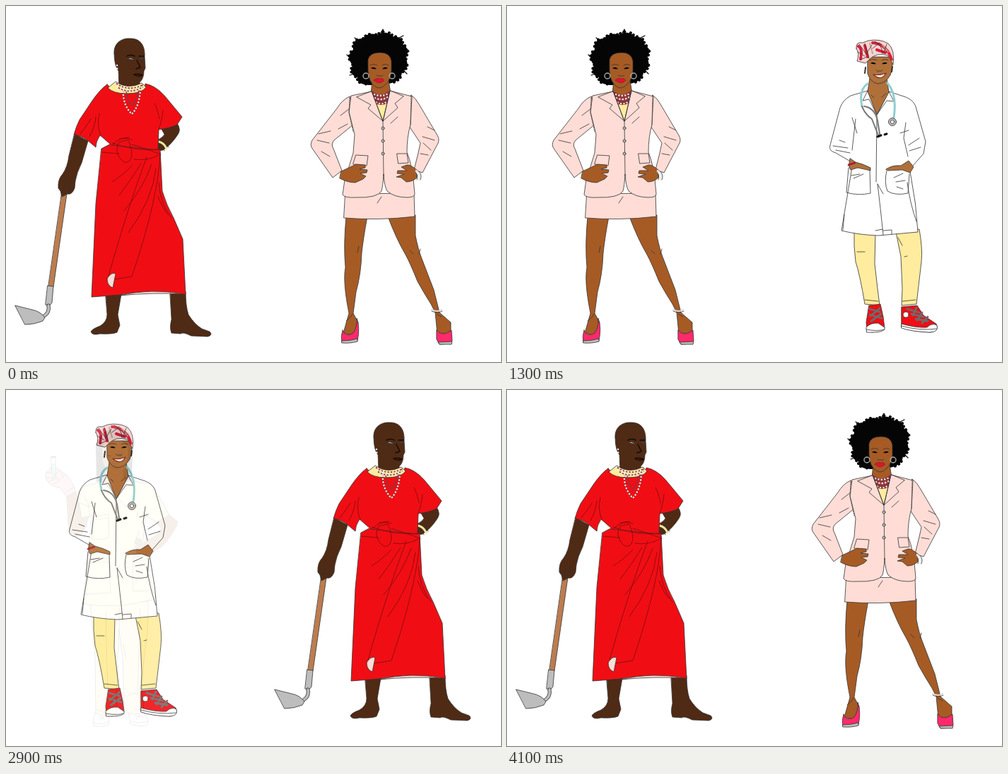
Recreate the animation shown at these times as an HTML page. Size 700x504 px, loop 4200 ms.

```html
<!DOCTYPE html>
<html lang="en">
<head>
<meta charset="utf-8">
<title>Women at work</title>
<style>
html, body { margin: 0; width: 100%; height: 100%; overflow: hidden; background: #fff; }
svg { display: block; width: 700px; height: 504px; }
path, circle, ellipse { stroke: #333; stroke-width: .8; stroke-linejoin: round; stroke-linecap: round; }
.side { isolation: isolate; }
.side use { mix-blend-mode: plus-lighter; }
.line { fill: none; }
.fold { fill: none; stroke: #7c0d10; }
.solid { fill: #050505; stroke: none; }
.white { fill: #fff; }
.red { fill: #f00e14; }
.yellow { fill: #ffec9e; }
.pink { fill: #ffddd6; }
.rose { fill: #f7b5b4; }
.hot { fill: #ff2a6b; }
.gray { fill: #bdbdbd; }
.lips { fill: #e3122a; stroke-width: .4; }
.wood { fill: #bd7c4e; }
.teal { fill: none; stroke: #8fcfd0; stroke-width: 3; }
.tube { fill: none; stroke: #777; stroke-width: 2; }
.beads { fill: none; stroke: #eee; stroke-width: 2.4; stroke-dasharray: .1 4.4; }
.cord { fill: none; stroke: #8d3440; stroke-width: 1.6; }
.stitch { fill: none; stroke-dasharray: 1.5 1.5; }
.deep { fill: #4f2a15; }
.dark { fill: #693a1c; }
.mid { fill: #a65b25; }
.warm { fill: #b0703a; }
.light { fill: #b0682f; }
</style>
</head>
<body>
<svg viewBox="0 0 700 504">
<defs>
<g id="face">
  <path class="line" stroke-width="1.3" d="M-13-8Q-8-11-3-8M4-8Q9-11 13-8"/>
  <path class="solid" d="M-12-4Q-8-7-4-3Q-8-2-12-4ZM4-3Q8-7 12-4Q8-2 4-3Z"/>
  <path class="line" d="M-4 6Q-2 8 0 7Q3 8 5 6"/>
</g>

<g id="farmer">
  <path class="wood" d="M81 250L88 252L67 398L60 397Z"/>
  <path class="gray" d="M59 396L67 397L65 420Q61 427 56 423Z"/>
  <path class="line" style="stroke-width:5" d="M60 424Q62 436 51 440"/>
  <path class="line" style="stroke:#bdbdbd;stroke-width:3.4" d="M60 424Q62 436 51 440"/>
  <path class="gray" d="M13 424L37 430Q48 432 55 441L52 446Q40 451 27 451Z"/>
  <path class="deep" d="M141 409L163 408L158 437L161 452L157 462Q150 465 133 464Q122 467 120 461Q122 457 133 453Q143 447 143 437ZM232 404H254Q254 425 258 437Q266 450 277 457L288 461Q293 466 285 468L262 467Q250 461 247 464L234 463Q231 455 234 444Z"/>
  <path class="deep" d="M97 181L116 191L107 222Q100 236 98 248L97 258Q93 268 87 266L79 270L77 262L74 258Q73 245 80 238Q87 228 89 212Z"/>
  <path class="line" d="M80 263L84 252L91 250M88 264L91 255"/>
  <path class="deep" d="M220 174L242 166Q248 175 243 182Q234 196 222 204L215 205L214 190Q222 186 224 182Z"/>
  <path class="line" style="stroke:#f0e59a;stroke-width:3" d="M216 192Q224 194 227 202"/>
  <path class="line" d="M214 194Q222 197 224 205M219 190Q227 192 230 200"/>
  <path class="red" d="M135 202L150 194L218 203L221 262Q227 282 237 300L250 330L254 409Q205 400 160 409L121 412L127 280Z"/>
  <path class="pink" d="M160 410Q205 399 252 408Q210 405 160 410Z"/>
  <path class="red" d="M143 111Q133 118 122 134L104 161Q99 171 96 182Q108 184 115 190Q121 195 127 200Q127 192 133 183L149 197L215 204L216 175Q232 173 242 168L249 157Q240 146 230 134Q217 117 204 112L197 110Q197 122 172 124Q154 124 143 111Z"/>
  <path class="fold" d="M134 183Q128 170 132 152M118 185Q126 171 127 157M105 181Q114 170 120 160M216 175Q221 160 222 148M217 160Q214 145 210 138M218 203Q182 206 150 194M150 197Q163 183 178 189M160 188L174 186M178 196Q197 202 219 210M160 193Q153 204 161 215Q168 226 176 218Q181 208 173 190ZM199 214Q174 280 145 382M218 208Q216 270 178 383L147 388M178 226Q165 240 150 249M191 223Q177 246 160 268M206 224Q194 258 167 290M212 230Q207 275 173 321M216 250Q218 280 234 300M215 270Q222 288 229 295M181 217Q200 220 216 211M135 207L160 209"/>
  <path class="pink" d="M143 386Q149 376 155 379L151 399Q143 396 143 386Z"/>
  <path class="deep" d="M153 67C152 53 163 45 176 46C190 46 197 56 196 72L197 88L195 92Q195 103 189 108L190 117H160L159 92Q153 84 153 67Z"/>
  <path class="yellow" d="M144 116L155 107Q172 119 192 109L198 115Q192 124 170 124Q152 124 144 116Z"/>
  <path class="cord" d="M155 109Q172 122 193 112M158 115Q174 126 193 115M166 117Q164 139 178 153Q189 141 190 118M170 120Q172 140 180 140L188 120"/>
  <path class="beads" d="M155 109Q172 122 193 112M158 115Q174 126 193 115M166 117Q164 139 178 153Q189 141 190 118"/>
  <path class="beads" d="M157 84L158 98"/>
  <path class="line" style="stroke:#160b06;stroke-width:1.5" d="M171 71Q177 68 182 71M188 71L195 71M185 77L190 87L184 89M181 97Q187 95 193 98Q187 101 181 97"/>
  <path class="white" style="stroke-width:1" d="M172 75Q177 72 181 76ZM189 75Q192 73 195 75Z"/>
</g>

<g id="suit">
  <path class="solid" d="M148 112C138 112 128 108 130 101C120 99 119 88 124 84C116 78 117 66 124 62C122 50 130 45 138 46C143 38 153 39 158 41C165 35 178 38 180 43C190 43 195 48 194 54C202 58 202 68 198 74C203 82 200 90 193 94C192 104 184 108 174 110Z"/>
  <path class="line" style="stroke:#050505;stroke-width:4;stroke-dasharray:.1 6 .1 9 .1 5" d="M148 110C138 112 128 108 130 101C120 99 119 88 124 84C116 78 117 66 124 62C122 50 130 45 138 46C143 38 153 39 158 41C165 33 178 37 180 43C190 43 195 48 194 54C202 58 202 68 198 74C203 82 200 90 193 94C192 104 184 108 174 110"/>
  <path class="line" style="stroke:#050505;stroke-width:1.2" d="M163 38L166 33L168 37M189 45L195 42M199 60L203 64M196 92L200 96M119 73L115 69M125 96L119 98M130 48L126 45"/>
  <path class="mid" d="M151 105L149 124L163 155L177 124L174 105Z"/>
  <path class="mid" d="M145 76Q147 66 162 66Q176 66 178 78V92Q177 104 170 111Q162 119 155 114Q146 108 145 92Z"/>
  <use href="#face" x="161" y="92"/>
  <path class="lips" d="M153 105Q157 101 161 103Q165 101 168 105Q161 113 153 105Z"/>
  <circle class="line" cx="142" cy="99" r="4" style="stroke:#aaa;stroke-width:1.4"/>
  <circle class="line" cx="179" cy="99" r="4" style="stroke:#aaa;stroke-width:1.4"/>
  <path class="mid" d="M114 298L144 298Q138 330 136 350Q135 380 128 405L124 435L131 448L129 468L110 463L118 435Q109 390 113 370Q110 340 114 298ZM173 298L212 296V325Q216 345 220 355L238 402L246 434L262 448V470L243 465L240 434L234 422Q225 408 215 390Q205 365 198 352Q185 330 173 298Z"/>
  <path class="line" d="M130 349L132 340M217 351L219 344M204 346L209 351M114 446Q121 441 123 436M242 436L249 440"/>
  <path class="line" style="stroke:#ddd;stroke-width:2" d="M235 430Q243 434 249 430"/>
  <path class="line" d="M235 432Q243 436 250 432"/>
  <path class="hot" d="M109 459Q113 470 124 463Q130 455 129 442Q134 455 130 474Q120 477 108 476Q106 468 109 459ZM242 459Q250 469 263 459L264 474Q262 479 246 479L242 472Z"/>
  <path class="gray" d="M108 474Q120 474 130 471V475Q120 478 108 477ZM244 476L264 475L263 479H247Z"/>
  <path class="pink" d="M113 266L210 265L211 298Q160 304 111 300Z"/>
  <path class="yellow" d="M151 130Q163 149 175 130L166 163Z"/>
  <path class="cord" style="stroke-width:6" d="M151 124Q163 134 174 124M153 133Q164 141 173 133"/>
  <path class="beads" d="M150 123Q163 131 175 123M151 128Q163 136 174 128M153 134Q164 143 173 134"/>
  <path class="pink" d="M119 128Q108 133 101 145L66 190Q62 197 67 203L95 243L108 233L96 202Q92 196 97 190L124 168ZM206 126Q213 131 217 139L243 183Q247 190 243 196L222 236L210 232L216 208L219 194L203 170Z"/>
  <path class="pink" d="M150 121L121 127L118 150L126 182L124 208Q118 228 112 246L109 267Q112 272 128 271Q158 272 164 262Q166 255 167 238Q168 255 172 262Q182 271 200 271Q211 271 211 266Q208 225 200 207Q200 185 205 168L207 128L176 120L166 163Z"/>
  <path class="line" d="M150 121L166 163L145 145L149 140L129 129ZM176 120L166 163L187 144L183 138L195 128ZM166 163L167 240M128 211L145 212L143 226L124 224ZM186 209H200L202 222L188 223ZM75 181L92 177M73 190L90 194M79 206L91 213M119 145L106 155M103 174L116 167M229 171L239 176M222 185L239 190M223 194L234 204M219 209L230 211M164 270L158 279M177 166L187 157"/>
  <path class="stitch" d="M119 130L118 151L124 178M206 128L205 168"/>
  <g class="gray"><circle cx="166" cy="173" r="2"/><circle cx="166" cy="191" r="2"/><circle cx="166" cy="209" r="2"/></g>
  <path class="mid" d="M107 234Q120 228 128 224L141 225V229L133 231L144 232L143 236L134 237L142 241L138 245L127 250Q116 250 105 244ZM215 233Q205 224 200 225L192 228L200 233L187 233L186 237L196 238L185 242L192 243L199 249Q208 249 214 243Z"/>
  <path class="line" style="stroke:#eee;stroke-width:4" d="M213 234Q219 239 217 245"/>
  <path class="line" d="M211 233Q216 240 214 246M217 234Q222 240 219 246"/>
</g>

<g id="engineer">
  <path class="dark" d="M142 447L160 448L156 459L140 457Z"/>
  <path class="gray" d="M126 455Q130 449 146 449L150 453L138 461Q126 460 126 455ZM135 462Q140 455 152 454Q164 456 167 451L183 449L187 462L181 466L177 457L166 463Q160 469 140 469Q134 467 135 462Z"/>
  <path class="gray" d="M127 258L188 257L186 305L188 340L183 450Q164 455 146 450L142 449L134 333Q129 300 127 258Z"/>
  <path class="line" d="M145 330Q152 345 161 348M149 342Q152 380 147 450M163 283L166 295"/>
  <path class="line" style="stroke-dasharray:12 3 2 3" d="M173 264L171 320M177 376L176 425"/>
  <path class="white" d="M146 114L158 118L185 106L160 142L134 195L125 190L126 170Q133 145 141 131Z"/>
  <path class="dark" d="M139 77L168 74L174 90L180 102L178 110L157 121Q150 118 145 113Q139 106 139 96Z"/>
  <path class="pink" d="M173 77L193 80Q194 94 187 98L178 99Z"/>
  <path class="solid" d="M168 75H176L175 92L171 88Z"/>
  <path class="line" d="M181 82Q190 84 189 92M178 86Q186 88 184 96"/>
  <path class="line" style="stroke:#180c06;stroke-width:1.2" d="M140 84Q144 81 147 84M152 84Q157 81 162 84M148 90L145 98L150 99M163 100L166 95"/>
  <path class="solid" d="M141 89L147 87L147 90ZM152 89L160 87L158 90Z"/>
  <path style="fill:#8a3b2e;stroke-width:.4" d="M142 104Q147 102 152 105Q147 110 142 104Z"/>
  <circle class="white" cx="178" cy="98" r="1.5"/>
  <path class="yellow" d="M123 74Q130 71 135 70Q137 50 160 44Q180 42 194 56Q200 66 200 80Q196 83 190 79Q170 73 152 75L125 77Z"/>
  <path class="line" d="M135 70Q165 67 199 76M142 70Q145 54 159 45M153 69Q157 54 168 47Q176 45 182 48M163 69Q170 54 187 51M174 71Q179 58 192 56"/>
  <path class="white" d="M146 114L157 121L178 108L186 109L158 144L150 133L142 138L143 122Z"/>
  <path class="line" d="M157 121L150 133"/>
  <path class="red" d="M183 107Q192 112 197 122Q204 136 201 149Q199 168 193 180Q189 186 189 200L190 258Q160 266 122 261L125 205L128 190Q140 150 162 126Z"/>
  <path class="fold" d="M183 108L176 133L169 134L173 141Q150 168 129 190M195 136Q179 147 164 171M166 163L148 184Q144 195 150 207L163 209Q178 202 193 178M151 181L166 189M148 190L163 197M160 171L175 180M168 168Q180 160 188 151M166 176L180 186M128 205L127 242"/>
  <path class="white" d="M65 147L128 207L124 211L88 189L60 156Z"/>
  <path class="gray" d="M60 150L64 146L68 150L66 163L62 160ZM63 158L89 184L124 207V211L88 189L61 162Z"/>
  <path class="dark" d="M83 155L92 150L98 152Q104 160 110 167L127 177L126 190L112 184L97 172Q88 172 82 165Z"/>
  <path class="gray" d="M80 156L108 153L109 156L81 159Z"/>
  <path class="dark" d="M151 190L126 190Q112 182 102 180L89 178Q84 184 89 190L98 199Q110 203 124 204L150 206Q146 198 151 190Z"/>
  <path class="line" d="M89 184L99 186M90 190L101 191M86 163L98 160"/>
</g>

<g id="doctor">
  <path class="yellow" d="M124 318L154 320L153 365L157 400L160 424L139 422Q132 380 126 362Q123 340 124 318ZM183 318L216 316Q221 345 219 362L212 422L191 424L192 400L190 355Z"/>
  <path class="line" d="M128 348L139 348M195 355L199 354M139 416L158 418M192 418L211 416M186 328L192 339"/>
  <path class="red" d="M145 424L161 422L165 440L167 456Q158 464 142 461L141 448ZM191 426L213 424L222 438L240 450Q245 459 232 462Q205 461 191 455Z"/>
  <path class="white" d="M141 455Q147 448 158 449L167 455Q169 463 142 462ZM191 450Q212 456 227 455Q234 448 241 452Q244 462 230 462Q205 461 191 456Z"/>
  <path class="line" d="M142 458Q155 461 167 458M191 453Q215 460 241 457"/>
  <circle class="white" cx="197" cy="437" r="4"/>
  <path class="line" style="stroke:#6c6c6c;stroke-width:2.8" d="M146 429L160 433M160 428L147 439M146 437L163 442M162 436L148 446M199 429L216 434M212 427L207 438M205 436L222 440M220 434L213 445M211 443L228 446M228 440L220 449"/>
  <path class="white" d="M143 120L119 127Q108 133 104 144L90 197Q87 205 98 208L122 222L119 240L106 318Q130 324 158 325L214 320Q212 280 204 240L202 230L207 226L222 209L225 192L212 146Q210 134 197 129L173 121L157 152Z"/>
  <path class="warm" d="M146 102L143 121L156 154L173 122L170 102Z"/>
  <path class="warm" d="M143 72H178Q179 88 175 98Q168 110 157 110Q147 108 143 96Z"/>
  <path class="line" d="M148 126L152 130M169 124L163 129"/>
  <use href="#face" x="159" y="85"/>
  <path class="white" style="stroke:#7a2d25;stroke-width:1.2" d="M151 97Q160 99 169 95Q162 107 151 97Z"/>
  <path style="fill:#f6d5d2" d="M127 60Q126 50 136 52L144 49Q160 46 172 53Q182 62 179 83L172 70Q155 65 145 76L140 81L128 78Q132 68 127 60Z"/>
  <path class="line" style="stroke:#d8203c;stroke-width:4;stroke-dasharray:6 2" d="M130 57Q136 60 133 75M139 56L143 72M150 52Q170 54 177 76M156 62L168 66"/>
  <path class="line" style="stroke:#b9a58f;stroke-width:2;stroke-dasharray:4 2" d="M146 53L150 67M164 55L172 65"/>
  <path class="line" d="M131 54L141 68L149 55M139 53L145 74M153 50Q164 56 164 67M129 65L139 71M150 60L160 52M170 54L166 66M133 76L142 72"/>
  <path class="line" style="stroke-width:2" d="M140 87L139 95M178 86L177 93"/>
  <path class="line" d="M143 120L136 134L145 132L156 154L155 249M157 252Q161 285 165 324M173 121L180 135L170 134L156 154M126 160L121 204M121 158L128 180M197 165L194 187L200 213M189 180L201 176M201 197L216 187M202 205L218 200M94 198L115 201M98 204L118 208M103 190L111 193M110 295L108 317M165 318L177 317V323M154 318L164 316M157 252L165 266M199 250Q203 280 212 305"/>
  <path class="line" d="M116 229L113 264Q130 269 147 265L146 232M170 233Q166 250 171 262Q182 269 200 265L202 238M120 240L132 238M123 244L137 238M180 243L193 237M183 249L196 247M184 256L193 259"/>
  <path class="warm" d="M118 216Q115 228 119 232L129 229L147 233V229Q138 224 126 221ZM169 231Q178 225 190 226L201 219L208 228L203 236L192 232L172 233Z"/>
  <path class="line" style="stroke:#a41c3a;stroke-width:2.5" d="M116 225L125 222"/>
  <path class="teal" d="M143 110Q130 118 135 142M171 109Q185 125 180 158"/>
  <path class="tube" d="M135 142Q139 153 149 160L158 183M138 142Q153 144 157 162L160 181"/>
  <path class="line" style="stroke:#111;stroke-width:3" d="M157 185L162 183M167 182L170 181"/>
  <circle class="gray" cx="178" cy="164" r="5.5"/><circle class="white" cx="178" cy="164" r="2.6"/>
</g>

<g id="nurse">
  <path class="solid" d="M128 130L127 80Q131 58 150 56Q160 53 170 59Q178 61 176 72L179 90L178 131L150 132Z"/>
  <path class="light" d="M142 106L139 130L157 156L174 132L166 124V106Z"/>
  <path class="light" d="M136 80Q140 68 154 69Q168 69 173 82L172 96Q170 110 164 116L155 122L146 117Q136 108 136 92Z"/>
  <path class="line" style="stroke:#050505;stroke-width:3;stroke-dasharray:.1 4" d="M137 76Q154 60 172 78"/>
  <use href="#face" x="154" y="97"/>
  <path style="fill:#9c4c38;stroke-width:.5" d="M147 110Q154 106 160 110Q154 116 147 110Z"/>
  <path class="light" d="M86 148L99 144Q103 165 106 177L118 176L112 195Q106 207 99 207Q89 205 88 190Z"/>
  <path class="light" d="M211 186L229 175L243 187Q240 198 224 218Q214 228 198 235L190 233L193 217L212 206L220 196Z"/>
  <path class="white" d="M126 457L146 458L145 474Q135 478 123 475Q123 466 126 457ZM174 457L194 455L201 468Q202 476 190 476L176 473Z"/>
  <path class="line" d="M124 471Q134 474 145 470M177 469Q190 473 201 469M130 462L139 466M140 461L131 468M181 461L194 463M190 459L184 467"/>
  <path class="yellow" d="M119 302L201 299Q202 340 195 380L192 420L195 456Q185 462 167 455L165 380L160 340L158 380L156 458Q145 465 127 458L126 380Q122 340 119 302Z"/>
  <path class="line" d="M160 308V345M141 314L144 430M190 309L186 430M166 360L169 378M154 430L147 449M173 433Q184 424 187 434M128 452L143 459"/>
  <path class="yellow" d="M136 130L111 136Q104 140 101 149L107 181L121 178L119 205L109 302Q125 307 165 305L208 297L212 293L208 284Q203 270 200 235L194 210Q196 190 198 178L213 187L231 177L215 148Q208 135 203 133L173 128L157 150Z"/>
  <path class="light" d="M193 216L190 211L185 210L182 216L186 219L182 222L185 226L184 230L192 234L199 234L197 220Z"/>
  <path class="line" d="M183 217L193 220M185 225L194 226M136 130L157 150Q165 162 174 170M184 181L187 172M186 174L188 181M110 150L119 166M105 160L117 165M119 178L116 163M124 179L145 176L146 209Q134 213 122 211ZM117 240L145 238L148 287L114 289ZM202 234L179 237L180 285L203 284M110 288L115 290M204 284L208 284M197 180L193 171M188 200L181 221"/>
  <path class="stitch" d="M124 184L145 181M117 245L145 243M180 242L201 240"/>
  <path class="rose" d="M58 128Q53 118 60 114L66 108L74 112L85 120Q98 135 98 144L86 151L76 138Q64 138 58 128Z"/>
  <path class="white" d="M64 94H70V124Q67 128 65 124Z"/>
  <path style="fill:#8ed9df;stroke-width:.4" d="M65 105H70V123Q67 127 65 123Z"/>
  <path class="line" style="stroke-width:2" d="M64 95H70"/>
  <path class="rose" d="M57 124Q54 118 60 116L69 120Q69 124 65 124ZM70 118L76 115L82 123L73 127Z"/>
  <path class="line" d="M60 130L70 126M66 134L76 128M84 145L96 138"/>
</g>
</defs>
</svg>
<script>
const LOOP = 4200, STEP = 100;
const LEVELS = [.35, .65, .9, 1];
// starts[i] is when cast[i] begins to dissolve into the next figure
const sides = [
  { x: 0, cast: ['farmer', 'engineer', 'suit', 'nurse', 'doctor'], starts: [100, 1000, 1900, 2700, 3400] },
  { x: 367, cast: ['suit', 'doctor', 'engineer', 'farmer', 'nurse'], starts: [500, 1400, 2300, 3000, 3800] }
];

function add(parent, tag, attributes) {
  const node = document.createElementNS(parent.namespaceURI, tag);
  for (const name in attributes) node.setAttribute(name, attributes[name]);
  return parent.appendChild(node);
}

for (const side of sides) {
  const group = add(document.querySelector('svg'), 'g', { class: 'side' });
  side.figures = side.cast.map(name =>
    add(group, 'use', { href: '#' + name, x: side.x && name === 'nurse' ? 390 : side.x }));
}

function dissolve(time, start) {
  const step = Math.floor((time - start) / STEP);
  return step < 0 ? 0 : LEVELS[Math.min(step, LEVELS.length - 1)];
}

function draw(now) {
  const time = now % LOOP;
  for (const { figures, starts } of sides) {
    const gone = starts.map(start => dissolve(time, start));
    figures.forEach((figure, i) => {
      const opacity = i ? gone[i - 1] - gone[i] : 1 - gone[0] + gone.at(-1);
      figure.style.opacity = opacity;
      figure.style.display = opacity > 0 ? '' : 'none';
    });
  }
  requestAnimationFrame(draw);
}
draw(0);
</script>
</body>
</html>
```
